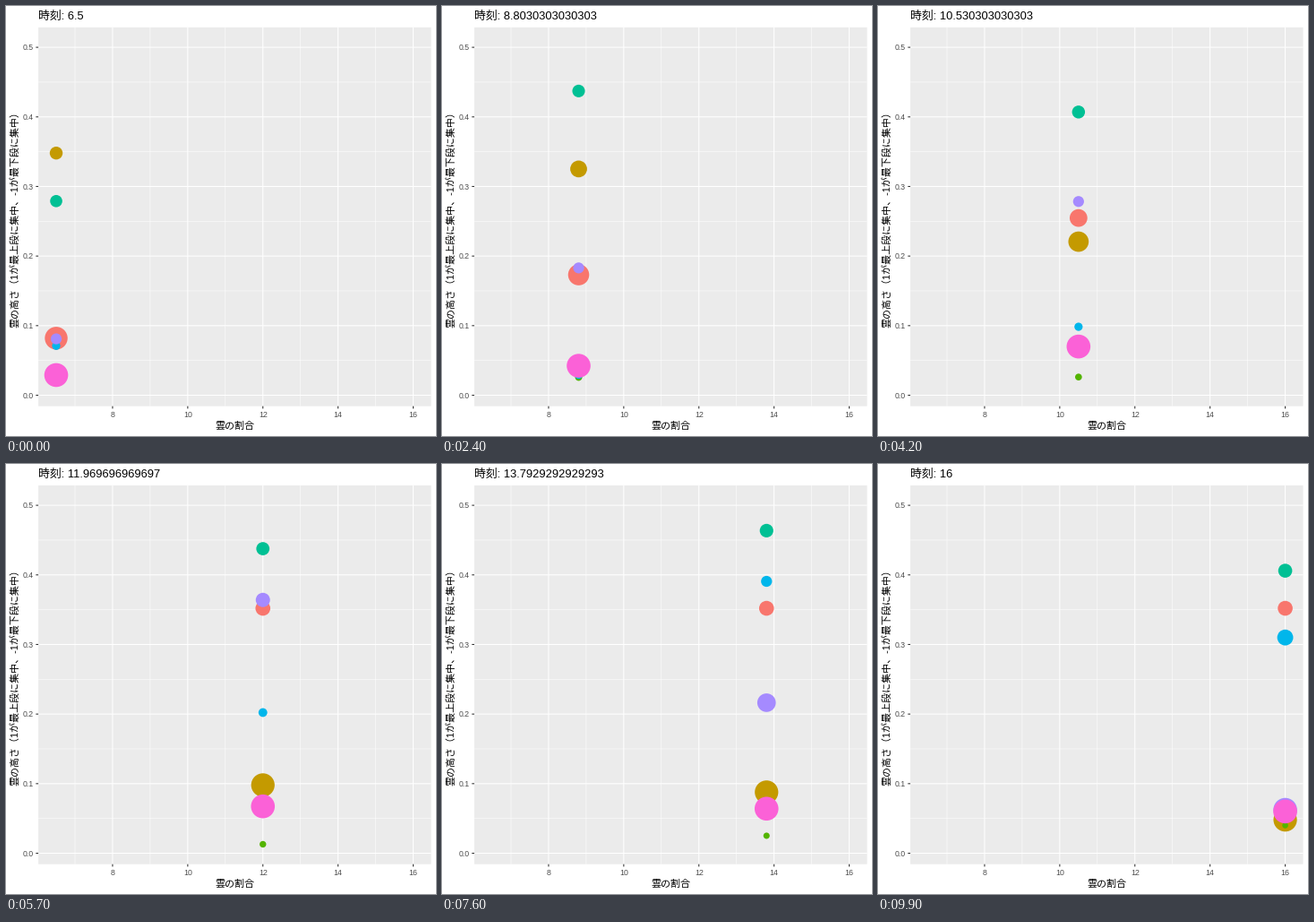
Recreate the animation shown at these times as a matplotlib script. Size 480 px wide and 480 px high, loop 10 s.

```python
import numpy as np
import matplotlib.pyplot as plt
from matplotlib.animation import FuncAnimation

plt.rcParams["font.family"] = ["Liberation Sans", "Noto Sans CJK JP"]

SIZE, FRAMES, INTERVAL = 480, 100, 100
LEFT, RIGHT, TOP, BOTTOM = 36.1, 474.5, 23.9, 446.7
T0, T1 = 6.5, 16.0

# Half-hourly samples sit on whole frames; x runs linearly between them.
hours = np.arange(T0, T1 + 0.1, 0.5)
hour_frames = np.round((hours - T0) / (T1 - T0) * (FRAMES - 1))

# Colour, height path, radius path (px); a key is (frame, value[, power])
SERIES = [
    ("#F8766D",
     [(0, .082), (32, .2585, 2.3), (42, .2547), (57, .352)],
     [(15, 12.7), (57, 8.3)]),
    ("#C49A00",
     [(0, .348), (32, .3025, 2.4), (57, .098), (99, .048, 2)],
     [(0, 7.2), (57, 13.1, 1.15)]),
    ("#53B400",
     [(0, .03), (15, .0155), (32, .035), (57, .0129), (99, .04)],
     [(0, 4.2), (99, 3.3)]),
    ("#00C094",
     [(0, .279), (32, .4725, .7), (42, .407), (76, .4636, .75), (99, .406)],
     [(0, 6.8), (99, 7.8)]),
    ("#00B6EB",
     [(0, .071), (15, .0195), (76, .3907, 1.9), (99, .31)],
     [(42, 4.6), (99, 8.9, 2)]),
    ("#A58AFF",
     [(0, .081), (57, .364, 1.18), (99, .0625, .9)],
     [(42, 6.1), (99, 13.2)]),
    ("#FB61D7",
     [(0, .029), (15, .042), (32, .0427), (42, .07), (99, .06)],
     [(0, 13.3)]),
]


def follow(keys, i):
    """Value at frame i; each key is reached by a power-law ease."""
    start, value = keys[0]
    for end, goal, *power in keys[1:]:
        u = np.clip((i - start) / (end - start), 0, 1)
        if u < 1:
            return value + (goal - value) * u ** (power[0] if power else 1)
        start, value = end, goal
    return value


def px(x):
    return 118.96 + (x - 8) * 41.95


def py(y):
    return 434.5 - 776.8 * y


fig = plt.figure(figsize=(SIZE / 72, SIZE / 72), dpi=72, facecolor="white")
ax = fig.add_axes([0, 0, 1, 1])
ax.set(xlim=(0, SIZE), ylim=(SIZE, 0))
ax.axis("off")


def line(xs, ys, color, width, z):
    ax.plot(xs, ys, color=color, lw=width, zorder=z,
            solid_capstyle="butt", snap=False)


def vline(x, width):
    line([px(x)] * 2, [TOP, BOTTOM], "white", width, 1)


def hline(y, width):
    line([LEFT, RIGHT], [py(y)] * 2, "white", width, 1)


def label(x, y, text, size, **style):
    return ax.text(x, y, text, size=size, va="baseline", **style)


ax.add_patch(plt.Rectangle((LEFT, TOP), RIGHT - LEFT, BOTTOM - TOP,
                           fc="#EBEBEB", ec="none", zorder=0, snap=False))

for x in range(7, 16, 2):
    vline(x, 0.53)
for y in np.arange(0.05, 0.5, 0.1):
    hline(y, 0.53)

for x in range(8, 17, 2):
    vline(x, 1.07)
    line([px(x)] * 2, [BOTTOM, BOTTOM + 2.75], "#333333", 1.07, 2)
    label(px(x), 459.3, str(x), 8.8, color="#4D4D4D", ha="center")
for y in np.arange(6) / 10:
    hline(y, 1.07)
    line([LEFT - 2.75, LEFT], [py(y)] * 2, "#333333", 1.07, 2)
    label(31, py(y) + 3.2, f"{y:.1f}", 8.8, color="#4D4D4D", ha="right")

label(255, 472, "雲の割合", 11, ha="center")
label(13, 358.7, "雲の高さ（1が最上段に集中、-1が最下段に集中）", 11,
      rotation=90, rotation_mode="anchor", ha="left")
title = label(LEFT, 15, "", 12.9, ha="left")

dots = ax.scatter([0] * len(SERIES), [0] * len(SERIES), zorder=3,
                  c=[color for color, _, _ in SERIES], linewidths=0)


def update(i):
    t = T0 + (T1 - T0) * i / (FRAMES - 1)
    title.set_text(f"時刻: {t:.15g}")
    x = px(np.interp(i, hour_frames, hours))
    dots.set_offsets([(x, py(follow(height, i))) for _, height, _ in SERIES])
    dots.set_sizes([(2 * follow(radius, i)) ** 2 for _, _, radius in SERIES])
    return title, dots


anim = FuncAnimation(fig, update, frames=FRAMES, interval=INTERVAL,
                     repeat=True, repeat_delay=0)
plt.show()
```
